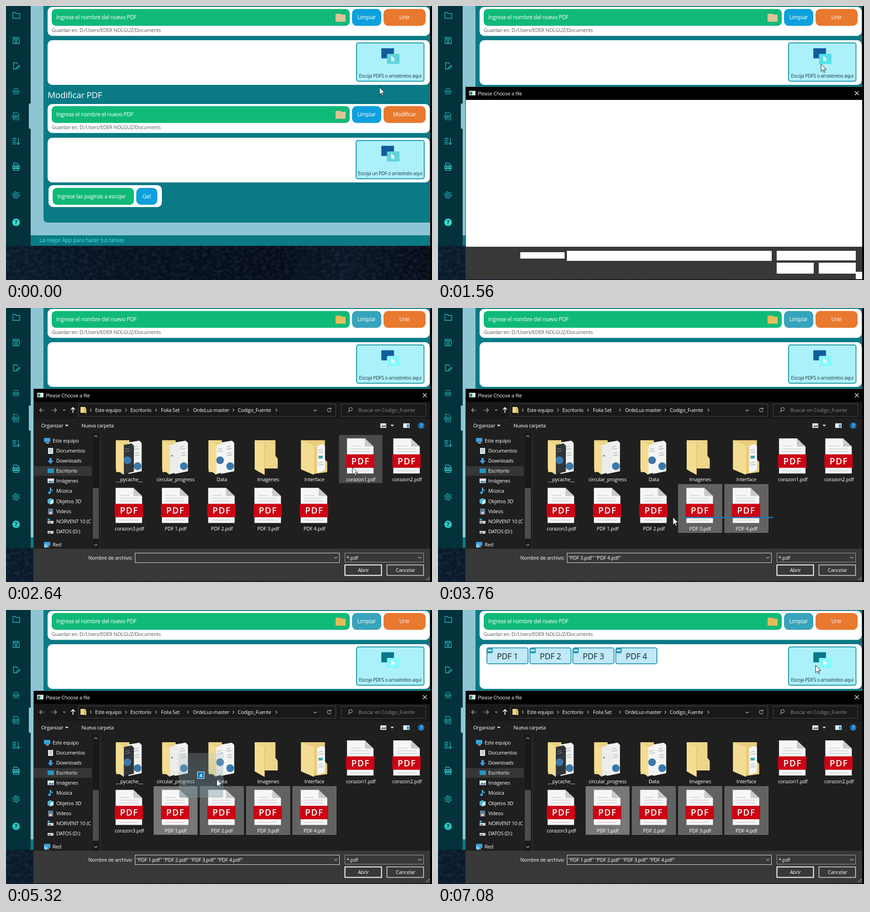
Recreate the animation shown at these times as an HTML page. Size 932 by 601 pixels, loop 8000 ms.

```html
<!DOCTYPE html>
<html lang="es">
<head>
<meta charset="utf-8">
<title>Unir PDF</title>
<style>
html, body { margin: 0; width: 100%; height: 100%; overflow: hidden; background: #000; }
svg { display: block; width: 932px; height: 601px; --fold: #dcc595; --clean: #0ca0dc; --glyph: #62d3da; --mark: #125c9c; }
text { font: 11px "Open Sans", "Noto Sans", sans-serif; letter-spacing: -.25px; fill: #fff; white-space: pre; }
.app { font-size: 12px; letter-spacing: -.3px; }
.path { letter-spacing: -.27px; fill: #5a5a5a; }
.drop { font-size: 10.3px; letter-spacing: -.26px; fill: #1c3440; }
.title { font-size: 19px; letter-spacing: -.35px; }
.chip { font-size: 18px; letter-spacing: -.3px; fill: #14252c; }
.foot { font-size: 12px; letter-spacing: -.3px; fill: #48e6da; }
.pdf { font-size: 19px; font-weight: 600; letter-spacing: 1.5px; }
.tiny { font-size: 5px; font-weight: 700; letter-spacing: 0; }
.dim { fill: #8a8a8a; }
.mid { text-anchor: middle; }
.line { fill: none; stroke: #28bfc1; stroke-width: 1.3; }
.chev { fill: none; stroke: #b8b8b8; stroke-width: 1.1; }
</style>
</head>
<body>
<svg id="stage" viewBox="0 0 932 601" xmlns="http://www.w3.org/2000/svg"></svg>
<script>
const rect = (x, y, w, h, fill, r = 0, more = '') =>
  `<rect x="${x}" y="${y}" width="${w}" height="${h}" rx="${r}" fill="${fill}" ${more}/>`;
const path = (d, fill, more = '') => `<path d="${d}" fill="${fill}" ${more}/>`;
const line = (d, cls = 'line', more = '') => `<path class="${cls}" d="${d}" ${more}/>`;
const dot = (x, y, r, fill, more = '') => `<circle cx="${x}" cy="${y}" r="${r}" fill="${fill}" ${more}/>`;
// Text is placed by the middle of its line
const text = (x, y, s, cls = '') => `<text x="${x}" y="${y + 4}" class="${cls}">${s}</text>`;
const group = (id, s, more = '') => `<g id="${id}" ${more}>${s}</g>`;
const move = (x, y, s) => `<g transform="translate(${x} ${y})">${s}</g>`;
const arrow = 'M0 0V16.5L3.8 13 6.3 18.8 8.6 17.8 6.2 12.1H11.5Z';

function backdrop() {
  return `<defs>
    <linearGradient id="sky"><stop offset="0" stop-color="#0a1a2c"/><stop offset=".3" stop-color="#06101e"/>
      <stop offset=".65" stop-color="#050c19"/><stop offset=".8" stop-color="#0a1626"/><stop offset="1" stop-color="#050b17"/></linearGradient>
    <linearGradient id="haze" x2="0" y2="1"><stop offset="0" stop-color="#a5bec8" stop-opacity=".24"/>
      <stop offset="1" stop-color="#6f929e" stop-opacity=".42"/></linearGradient>
    <filter id="grain" x="0" y="0" width="1" height="1"><feTurbulence type="fractalNoise" baseFrequency=".1 .14" numOctaves="4" seed="8"/>
      <feColorMatrix values="0 0 0 0 .14  0 0 0 0 .23  0 0 0 0 .34  1.6 0 0 0 -.6"/></filter></defs>` +
    rect(0, 0, 932, 601, '#000') + rect(0, 525, 928, 76, 'url(#sky)') +
    '<rect y="526" width="928" height="75" filter="url(#grain)" opacity=".22"/>' +
    path('M668 526L635 570 626 601H668Z', '#0c1828', 'opacity=".5"');
}

function sidebar() {
  const page = 'M16.5 0H24l4 4v12H16.5Z';
  const gear = Array.from({ length: 24 }, (_, i) => {
    const a = (i + .5) * Math.PI / 12, r = (i >> 1) % 2 ? 5.7 : 7.3;
    return `${i ? 'L' : 'M'}${(22 + r * Math.cos(a)).toFixed(1)} ${(414.5 + r * Math.sin(a)).toFixed(1)}`;
  }).join('') + 'Z';
  return rect(0, 0, 54, 526, '#03323b') + rect(50, 214, 5, 55, '#8ec5d4') +
    line('M15 27V14h5l2 2.5h8V27Z') +
    line('M15.5 69H27l2 2v11.5H15.5ZM18.5 69v4h7v-4') + dot(22, 78, 2.4, 'none', 'class="line"') +
    line('M26 128l-3-3.5h-6.5v13.5h6M23 135l6-5 1.5 2-6 5.5-2.5.5Z') +
    line('M14 186h16M17.5 184.5l1.5-4.5 3 1 3-1 1.5 4.5', 'line', 'opacity=".75"') +
    dot(18.5, 190.5, 2.5, 'none', 'class="line" opacity=".75"') + dot(25.5, 190.5, 2.5, 'none', 'class="line" opacity=".75"') +
    move(0, 233.5, line(page, 'line', 'opacity=".8"') + rect(14, 6, 12, 6, '#03323b', 1, 'stroke="#2cb5b6"') +
      '<text class="tiny" x="15" y="11" style="fill:#2cb5b6">PDF</text>') +
    line('M14 290.5h9M14 294.5h8M14 298.5h8M14 302.5h9M27 289v14M23.5 300l3.5 4 3.5-4') +
    move(0, 344.5, line(page) + rect(14, 5, 16, 8, '#28bfc1', 1) + '<text class="tiny" x="15" y="10.8" style="fill:#03323b">DOCX</text>') +
    line(gear) + dot(22, 414.5, 2.5, 'none', 'class="line"') +
    dot(22, 474.5, 8.3, 'var(--help)') + '<text class="mid" x="22" y="479" style="fill:#03323b;font-size:13px;font-weight:700">?</text>';
}

const button = (x, y, w, s, fill) => rect(x, y, w, 37, fill, 10) + text(x + w / 2, y + 18.5, s, 'app mid');

function nameCard(dy, hint, action) {
  return move(0, dy, rect(91, 2, 836, 63.5, '#fff', 10) + rect(100, 6.5, 652, 37, '#10b978', 9) +
    text(110, 25, hint, 'app') +
    path('M721 17H732L734 19H743V34.5H721Z', 'var(--fold)') +
    button(757, 6.5, 64, 'Limpiar', 'var(--clean)') + button(826, 6.5, 92, action, '#e8792e') +
    text(100, 53, 'Guardar en: D:/Users/EDER NOLGUZ/Documents', 'path'));
}

function dropCard(dy, x, w, s) {
  return move(0, dy, rect(91, 75, 836, 98, '#fff', 10) +
    rect(x, 81, w, 84, '#acf0fa', 4, 'stroke="#1c9aa8" stroke-width="2"') +
    rect(821, 92.5, 28, 22.5, 'var(--mark)', 0, 'stroke="#acf0fa" stroke-dasharray="1.5 3"') +
    rect(833.5, 105, 27.5, 22, 'var(--glyph)', 2) +
    `<path transform="translate(843 109) scale(.75)" d="${arrow}" fill="#fff"/>` +
    text(840.5, 152.5, s, 'drop mid'));
}

function app() {
  return rect(54, 0, 874, 526, '#8ec5d4') + rect(54, 503, 874, 23, '#0a7a85') +
    path('M82 0V465Q82 475 92 475H928V0Z', '#0a7a85') + sidebar() +
    nameCard(0, 'Ingrese el nombre del nuevo PDF', 'Unir') + dropCard(0, 767, 147.5, 'Escoja PDFS o arrastrelos aqui') +
    text(91, 198, 'Modificar PDF', 'title') +
    nameCard(213, 'Ingrese el nombre el nuevo PDF', 'Modificar') + dropCard(214, 766, 149, 'Escoja un PDF o arrastrelo aqui') +
    rect(93, 393, 248, 48, '#fff', 10) + rect(102, 399, 178, 37, '#10b978', 9) +
    text(112, 418, 'Ingrese las paginas a escojer', 'app') + button(285, 399, 46, 'Get', '#0ca0dc') +
    text(73, 514, 'La mejor App para hacer tus tareas', 'foot');
}

const chips = () => [1, 2, 3, 4].map((n, i) => move(106 + i * 94, 82,
  rect(1, 1, 90, 35, '#c0e8f7', 4, 'stroke="#2a9cb6" stroke-width="2"') + rect(1, 1, 13, 12, '#2a9cb6', 3) +
  rect(3, 5, 9, 3, '#e8faff', 1) + text(46, 21.5, 'PDF ' + n, 'chip mid'))).join('');

// Files
const cellX = i => 221.8 + i * 101.25;
const files = ['__pycache__', 'circular_progress', 'Data', 'Imagenes', 'Interface', 'corazon1.pdf', 'corazon2.pdf',
  'corazon3.pdf', 'PDF 1.pdf', 'PDF 2.pdf', 'PDF 3.pdf', 'PDF 4.pdf']
  .map((name, i) => ({ name, x: cellX(i % 7), y: i < 7 ? 278 : 386.5 }));

function pdfIcon() {
  const rows = [[24, 22], [30, 41], [36, 41], [78, 41]].map(([y, w]) => rect(26, y, w, 1.5, '#cfcfcf')).join('');
  return path('M18 8H57L76 26V85H18Z', '#f6f6f6') + path('M57 8V26H76Z', '#c9c9c9') + rows +
    rect(16, 43, 62, 29.5, '#cc0414', 1) + text(47.7, 60.5, 'PDF', 'pdf mid');
}

function folderIcon(kind) {
  const light = '#f4dd92';
  const flap = x => path(`M18.5 12L${x} 23V88L18.5 76Z`, light);
  const sheet = (x, w, y, h, fill) => path(`M${x} ${y + 4}L${x + w - 5} ${y}L${x + w} ${y + 5}V${y + h - 6}L${x} ${y + h}Z`, fill);
  const logo = (x, y) => dot(x, y, 8.5, '#3b78aa');
  const scribble = (x, y, s = '#8c9aa0') => line(`M${x} ${y}l9-2M${x} ${y + 5}l11-2`, 'chev', `style="stroke:${s}"`);
  if (kind === 3) {
    return path('M19 12H64V46L69 53V74H19Z', '#eed589') + flap(40) + line('M40 23V88', 'chev', 'style="stroke:#d5b862"');
  }
  if (kind === 4) {
    return path('M19 12H71V54L76 60V82L46 86 19 74Z', '#e9cc7c') + sheet(54, 17, 20, 64, '#f3f6f6') +
      scribble(57, 34) + scribble(57, 62) + rect(57, 46, 9, 6, '#3ba5ad') + flap(47);
  }
  const front = ['#30343a', '#ececec', '#f4f4f4'][kind];
  return path('M19 12H48V82H19Z', '#ecd283') + sheet(46, 29, 13, 73, '#f2f2ee') +
    scribble(58, 27) + scribble(60, 41) + logo(66, 69) + sheet(33, 25, 19, 68, front) +
    (kind === 1 ? dot(40, 46, 1.8, '#777') : scribble(39, 32) + logo(44, 56)) + flap(36);
}

const fileGrid = () => files.map((f, i) => move(f.x, f.y,
  `<rect class="cell" x=".5" y=".5" width="95" height="105.5" fill="none"/>` +
  (i < 5 ? folderIcon(i) : pdfIcon()) + text(48, 97.5, f.name, 'mid'))).join('');

function tree() {
  const disk = rect(0, -1, 13, 6, '#d2d2d2', 1) + rect(2, 2, 5, 1.5, '#444');
  const screen = rect(0, -6, 14, 9, '#3aa0dc', 1) + rect(4, 4, 7, 2, '#b5cad5');
  const rows = [
    ['Este equipo', 291, screen],
    ['Documentos', 313, rect(1, -6, 11, 13, '#eee') + line('M3-3h7M3 0h7M3 3h7', 'chev', 'style="stroke:#3a8fc4"')],
    ['Downloads', 335, path('M4-6H9V0H13L6.5 7 0 0H4Z', '#38a2e0')],
    ['Escritorio', 357, rect(0, -5, 14, 10, '#2396c4', 1)],
    ['Imágenes', 379, rect(0, -5, 14, 10, '#eee') + path('M1 4L5-1 9 2 13-1V4Z', '#40839c')],
    ['Música', 401, path('M5-7H7Q8-3 11-1V2Q8-1 7-1V4A3 2.5 0 1 1 5 2Z', '#45a8e0')],
    ['Objetos 3D', 424, path('M0-4L6-7 13-4V4L6 7 0 4Z', '#49b6cf') + path('M6-1L13-4V4L6 7Z', '#d4eef3')],
    ['Videos', 446, rect(1, -6, 11, 13, '#737f8a') + rect(4, -5, 5, 5, '#3b80bf') + rect(4, 1, 5, 5, '#c7d1d4')],
    ['NORVENT 10 (C', 468, disk + rect(0, -6, 5, 4, '#35a7dc')],
    ['DATOS (D:)', 490, disk],
    ['Red', 519, screen + dot(4, 3, 4, '#7bc5e8')]
  ];
  return rect(61, 347, 127, 21, '#363636') + '<clipPath id="nav"><path d="M61 275H189V528H61Z"/></clipPath>' +
    group('rows', rows.map(([s, y, icon], i) => {
      const root = i % 10 === 0;
      return move(root ? 83 : 91, y, icon) + text(root ? 102 : 110, y, s);
    }).join(''), 'clip-path="url(#nav)"') +
    rect(190, 274, 14, 254, '#191919') + rect(190, 395, 13, 111, '#4d4d4d') +
    line('M193 283l3.5-3.5 3.5 3.5M193 518l3.5 3.5 3.5-3.5', 'chev') + rect(206, 274, 1, 254, '#343434');
}

function dialog() {
  const sep = x => line(`M${x} 221l3 3-3 3`, 'chev');
  const crumbs = [['Este equipo', 195], ['Escritorio', 272], ['Folia Set', 339], ['OrdeLuz-master', 409], ['Codigo_Fuente', 507]];
  const frame = rect(60, 177, 868, 422.5, '#383838') + rect(61, 178, 867, 28, '#000') +
    rect(68, 186, 14, 10, '#e8e8e8') + rect(69, 188, 6, 7, '#2e8b82') + text(87, 191.5, 'Please Choose a file') +
    line('M912 187l8.5 8.5M920.5 187l-8.5 8.5', 'chev', 'style="stroke:#fff"');
  const blank = rect(61, 206, 867, 322, '#fff') + rect(180, 540, 97, 14, '#fff') + rect(282, 537, 448, 22, '#fff') +
    rect(741, 537, 173, 21, '#fff') + rect(741, 563, 81, 24, '#fff') + rect(833, 563, 81, 24, '#fff') + rect(914, 583, 14, 16, '#fff');
  const box = (x, y, w, h, c, k = 1) => rect(x + .5, y + .5, w - 1, h - 1, 'none', 0, `stroke="${c}" stroke-width="${k}"`);
  const chrome = rect(61, 206, 867, 322, '#1f1f1f') + rect(61, 206, 867, 37, '#191919') +
    line('M84 224H74M78 219.5L73.5 224l4.5 4.5', 'chev') + line('M100 224h10M106 219.5l4.5 4.5-4.5 4.5', 'chev') +
    line('M125 222.5l2.5 2.5 2.5-2.5', 'chev') + line('M146.5 230V219M142 223l4.5-4.5 4.5 4.5', 'chev', 'style="stroke:#fff;stroke-width:1.7"') +
    box(158, 210, 564, 28, '#4a4a4a') + box(733, 210, 186, 28, '#4a4a4a') +
    rect(163, 217, 11, 13, '#f1d582') + path('M171 217L176 221V231L171 230Z', '#d8b75d') +
    [184, 261, 327, 397, 496].map(sep).join('') + group('lastSep', sep(590)) +
    crumbs.map(([s, x]) => text(x, 224, s)).join('') +
    line('M673 223l3.5 3.5 3.5-3.5M710 221a4 4 0 1 0 1 4M711 219v3h-3', 'chev') +
    line('M748 229l4-4', 'chev') + dot(754, 222, 3.5, 'none', 'class="chev"') + text(771, 224, 'Buscar en Codigo_Fuente', 'dim') +
    text(77, 258, 'Organizar') + path('M129 256h8l-4 4Z', '#ddd') + text(165, 258, 'Nueva carpeta') +
    rect(819, 253, 13, 10, '#eee') + path('M820 261l4-4 3 2 4-3v5Z', '#40708c') + path('M841 256h8l-4 4Z', '#ddd') +
    rect(869, 253, 14, 10, '#eee') + rect(877, 255, 5, 7, '#3a9ccc') +
    dot(908.5, 258, 7, '#1672b9') + text(908.5, 258, '?', 'mid') +
    text(180, 547.5, 'Nombre de archivo:') + box(282, 537, 448, 22, '#e6e6e6') + box(741, 537, 173, 21, '#a4a4a4') +
    text(745, 547.5, '*.pdf') + line('M718 546l3.5 3.5 3.5-3.5M902 546l3.5 3.5 3.5-3.5', 'chev') +
    box(741, 563, 81, 24, '#fff', 2) + box(833, 563, 81, 24, '#ddd', 1.5) +
    text(782, 575, 'Abrir', 'mid') + text(874, 575, 'Cancelar', 'mid') +
    [[924, 590], [924, 594], [920, 594]].map(([x, y]) => rect(x, y, 2, 2, '#bbb')).join('');
  return frame + group('blank', blank) + group('chrome', chrome + group('content', tree() + fileGrid()) +
    '<text id="names" x="285" y="551.5"></text>');
}

const drag = rect(0, 0, 96, 96, 'url(#haze)', 1, 'stroke="#9fb6be" stroke-opacity=".35"') +
  rect(40, 40.5, 14.5, 14.5, '#0d74be', 0, 'stroke="#fff"') + '<text class="mid" x="47.3" y="52" style="font-weight:700">4</text>';
const banned = dot(0, 0, 5.5, '#d6b9bc', 'stroke="#8f4652" stroke-width="2"') + path('M-4-4L4 4', 'none', 'stroke="#8f4652" stroke-width="2"');

const stage = document.getElementById('stage');
stage.innerHTML = backdrop() + app() + group('chips', chips()) + group('dialog', dialog()) +
  '<rect id="band" y="458" height="3" fill="#1c75b5" opacity=".9"/>' +
  group('drag', drag) + group('banned', banned) +
  group('cursor', path(arrow, '#fff', 'stroke="#111"'));

const el = id => document.getElementById(id);
const show = (id, on) => el(id).setAttribute('visibility', on ? 'inherit' : 'hidden');
const place = (id, [x, y]) => el(id).setAttribute('transform', `translate(${x} ${y})`);
const cells = [...document.querySelectorAll('.cell')];

const cursorKeys = [[0, 817, 178], [400, 840, 131], [560, 840, 131], [720, 838, 127], [2080, 838, 127], [2640, 758, 349],
  [2920, 733, 450], [2960, 733, 450], [3080, 733, 459], [3240, 733, 459], [3760, 514, 459], [4080, 372, 458],
  [4120, 372, 458], [4840, 386, 437], [5120, 386, 437], [5320, 461, 371], [5760, 681, 215], [5920, 780, 145],
  [5960, 780, 145], [6240, 826, 121]];
const dragKeys = [[5160, 318, 370], [5320, 379, 314.5], [5760, 604, 145.5], [5920, 702, 76], [5960, 703, 75], [6240, 749, 51]];

function along(keys, t) {
  const i = keys.findIndex(k => k[0] > t);
  if (i < 0) return keys.at(-1).slice(1);
  if (!i) return keys[0].slice(1);
  const [t0, x0, y0] = keys[i - 1], [t1, x1, y1] = keys[i], f = (t - t0) / (t1 - t0);
  return [x0 + (x1 - x0) * f, y0 + (y1 - y0) * f];
}

function draw(t) {
  const [x, y] = along(cursorKeys, t);
  place('cursor', [Math.round(x), Math.round(y)]);

  show('dialog', t >= 1520);
  show('blank', t < 1600);
  show('chrome', t >= 1600);
  show('content', t >= 1640);
  show('lastSep', t >= 1920);
  show('chips', t >= 6760);

  // The selection band trails the cursor a little
  const banding = t >= 3280 && t <= 4080;
  const left = Math.min(733, x + 23);
  show('band', banding);
  el('band').setAttribute('x', left);
  el('band').setAttribute('width', 733 - left);

  const reach = t < 3280 ? 999 : banding ? left : 0;
  const picked = files.filter((f, i) => i > 7 && reach < f.x + 96);
  files.forEach((f, i) => {
    const over = t >= 1720 && t < 5160 && !banding && x >= f.x && x < f.x + 96 && y >= f.y && y < f.y + 106;
    const grabbed = t >= 5160 && f === picked[0];
    const on = picked.includes(f);
    cells[i].setAttribute('fill', on ? (over || grabbed ? '#777' : '#626262') : over ? '#4b4b4b' : 'none');
    cells[i].setAttribute('stroke', on ? '#777' : 'none');
  });
  el('names').textContent = picked.length > 1 ? picked.map(f => `"${f.name}"`).join(' ') : picked.map(f => f.name).join('');

  const dragging = t >= 5160 && t < 6720;
  show('drag', dragging);
  place('drag', along(dragKeys, t));
  show('banned', t >= 5520 && t < 5840);
  place('banned', [x - 10, y + 37.5]);

  const late = t >= 1600;
  const tint = (name, value) => stage.style.setProperty('--' + name, value);
  tint('fold', late ? '#e3bd58' : '#dcc595');
  tint('clean', late ? '#36a4bc' : '#0ca0dc');
  tint('glyph', late ? '#84f9fb' : t >= 1520 ? '#52e0e4' : '#62d3da');
  tint('mark', t >= 5160 ? '#08788a' : '#125c9c');
  tint('help', late ? '#2bc4c6' : '#2fe0d6');
}

const start = performance.now();
function tick() {
  const t = (performance.now() - start) % 8000;
  draw(Math.floor(t / 40) * 40);
  requestAnimationFrame(tick);
}
tick();
</script>
</body>
</html>
```
